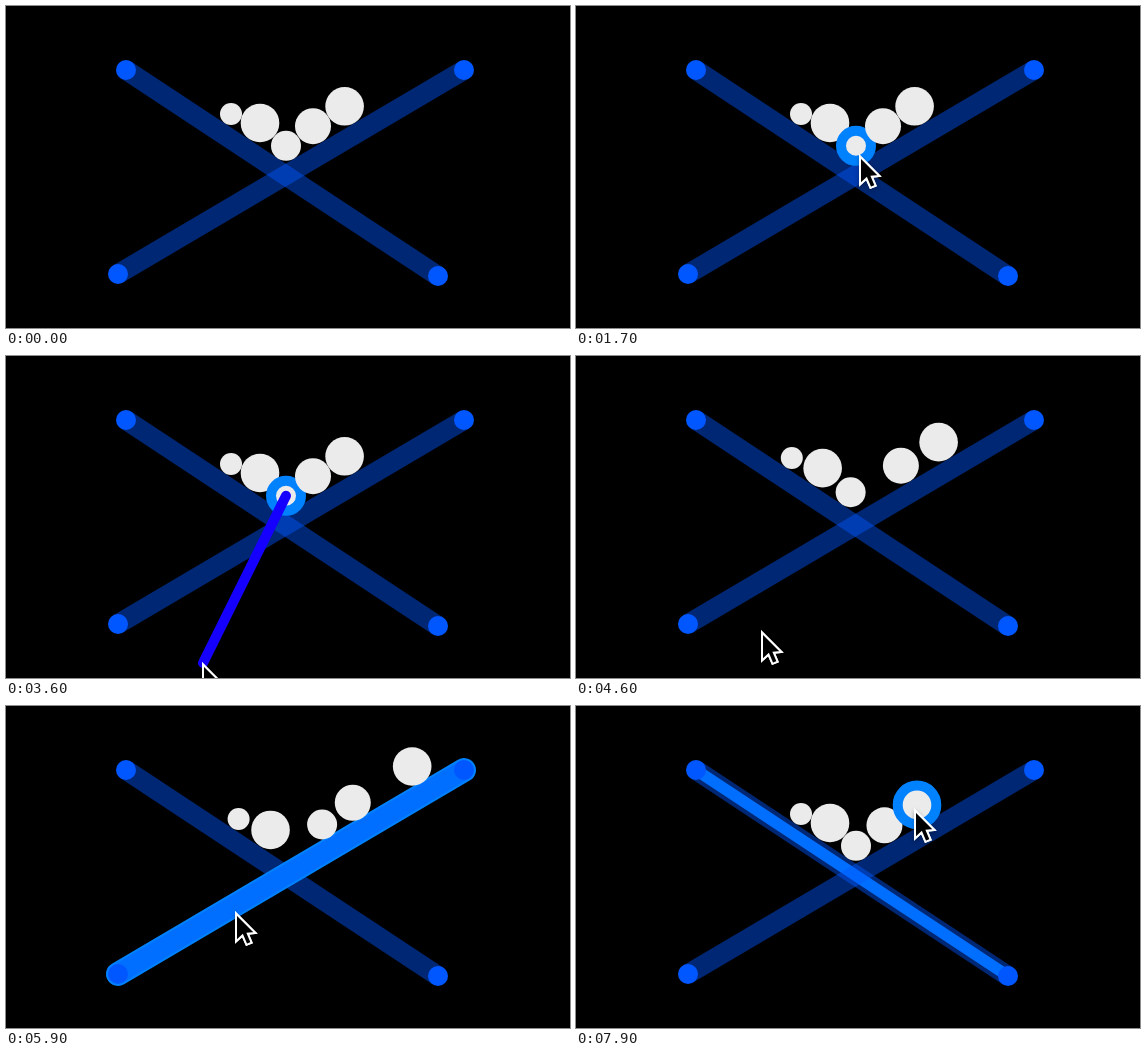
Recreate the animation shown at these times as an HTML page with a canvas. Size 564 by 322 pixels, loop 8 s.

```html
<!DOCTYPE html>
<html lang="en">
<head>
<meta charset="utf-8">
<title>Balls on crossed beams</title>
<style>
html, body { margin: 0; width: 100%; height: 100%; overflow: hidden; background: #000; }
canvas { display: block; }
</style>
</head>
<body>
<canvas id="stage" width="564" height="322"></canvas>
<script>
const ctx = document.getElementById('stage').getContext('2d');
const LOOP = 8000, STEP = 100;
const BLUE = '#0057ff', HOVER = '#0082ff';
const SHOT = 4.495;          // moment the dragged ball is released
const SWELL = 96;            // growth of hover strokes, px per second
const GRAVITY = 635;

// Beams run from their first end to the second; hover lists [from, until] spans.
const fallBeam = { ends: [120, 64, 432, 270], uphill: -1, hover: [[7.78, 8.1]] };
const riseBeam = { ends: [112, 268, 458, 64], uphill: 1,
  hover: [[.25, .95], [2.05, 2.45], [5.5, 6.6]] };

for (const beam of [fallBeam, riseBeam]) {
  const [x1, y1, x2, y2] = beam.ends, length = Math.hypot(x2 - x1, y2 - y1);
  beam.up = [(x2 - x1) / length * beam.uphill, (y2 - y1) / length * beam.uphill];
  beam.pull = -GRAVITY * beam.up[1] / 2;
}

// throws: [start, distance uphill, end, distance uphill, beam if not the ball's own]
const middle = { x: 280, y: 139.8, r: 15, beam: riseBeam, hover: [[.85, 4.6]],
  throws: [[SHOT, 0, 4.95, 0, fallBeam], [5.25, 0, 6.3, 0], [6.6, 0, 7.05, 0, fallBeam]] };
const balls = [
  { x: 225, y: 108, r: 11, beam: fallBeam, throws: [[SHOT, 0, 5.2, 0], [6.2, -13, 7.17, 0]] },
  { x: 254, y: 117, r: 19.3, beam: fallBeam, throws: [[SHOT, 0, 5.08, 0], [6.25, -18, 7.05, 0]] },
  middle,
  { x: 307, y: 120.2, r: 18, beam: riseBeam,
    throws: [[SHOT, 0, 5.55, 47], [5.55, 47, 6.2, 14], [6.55, 0, 6.9, 1.7]] },
  { x: 338.6, y: 100.3, r: 19.3, beam: riseBeam, hover: [[7.75, 8.2]],
    throws: [[SHOT, 0, 6.22, 7.3], [6.22, 7.3, 6.96, 2.8]] }
];

const pointer = [[.1, 236, 325], [1, 284, 149], [1.9, 284, 149], [2.7, 207, 296],
  [3.6, 197, 307], [4.4, 186, 275], [4.6, 186, 275], [5.9, 230, 206],
  [6.9, 286, 94], [7.5, 310, 180], [7.9, 339, 103]];
const ARROW = [[0, 0], [0, 28], [6.5, 22], [10.5, 31.3], [15.6, 29.2], [11.8, 20.2], [19.5, 19.5]];

const lerp = (a, b, f) => a + (b - a) * f;
const clamp = (v, max) => Math.max(0, Math.min(max, v));

function swell(spans, t, max) {
  return Math.max(0, ...spans.map(([from, until]) =>
    clamp(Math.min(t - from, until - t) * SWELL, max)));
}

// A ball follows a parabola during a throw and drifts evenly between throws.
function place(ball, t) {
  let s = 0, beam = ball.beam, last;
  for (const [t0, s0, t1, s1, other] of ball.throws) {
    if (t < t0) {
      if (last) s = lerp(last.s, s0, (t - last.t) / (t0 - last.t));
      break;
    }
    if (t < t1) {
      beam = other || beam;
      s = lerp(s0, s1, (t - t0) / (t1 - t0)) + beam.pull * (t - t0) * (t1 - t);
      break;
    }
    s = s1;
    last = { t: t1, s: s1 };
  }
  return [ball.x + beam.up[0] * s, ball.y + beam.up[1] * s];
}

function pointerAt(t) {
  const i = pointer.findIndex(p => p[0] > t);
  if (i < 1) return pointer.at(i).slice(1);
  const [t0, x0, y0] = pointer[i - 1], [t1, x1, y1] = pointer[i];
  const f = (t - t0) / (t1 - t0), eased = f * f * (3 - 2 * f);
  return [lerp(x0, x1, eased), lerp(y0, y1, eased)];
}

function line(x1, y1, x2, y2, width, color, cap) {
  ctx.beginPath();
  ctx.moveTo(x1, y1);
  ctx.lineTo(x2, y2);
  ctx.lineWidth = width;
  ctx.strokeStyle = color;
  ctx.lineCap = cap;
  ctx.stroke();
}

function disc(x, y, r, color) {
  ctx.beginPath();
  ctx.arc(x, y, r, 0, 7);
  ctx.fillStyle = color;
  ctx.fill();
}

function drawBeam(beam, t) {
  const [x1, y1, x2, y2] = beam.ends, glow = swell(beam.hover, t, 24);
  if (glow) line(x1, y1, x2, y2, glow, HOVER, 'round');
  ctx.globalAlpha = .45;
  line(x1, y1, x2, y2, 20, BLUE, 'butt');
  ctx.globalAlpha = 1;
  disc(x1, y1, 10, BLUE);
  disc(x2, y2, 10, BLUE);
}

function drawBall(ball, t) {
  disc(...place(ball, t), ball.r, '#ebebeb');
  const ring = swell(ball.hover || [], t, 10);
  if (ring) {
    ctx.lineWidth = ring;
    ctx.strokeStyle = HOVER;
    ctx.stroke();
  }
}

function drawPointer(x, y) {
  ctx.save();
  ctx.translate(x, y + 1.5);
  ctx.beginPath();
  ARROW.forEach(p => ctx.lineTo(...p));
  ctx.closePath();
  ctx.lineWidth = 2;
  ctx.strokeStyle = '#fff';
  ctx.fillStyle = '#000';
  ctx.shadowColor = 'rgba(0,0,0,.4)';
  ctx.shadowBlur = 4;
  ctx.shadowOffsetY = 2;
  ctx.stroke();
  ctx.shadowColor = 'transparent';
  ctx.fill();
  ctx.stroke();
  ctx.restore();
}

function draw(t) {
  ctx.fillStyle = '#000';
  ctx.fillRect(0, 0, 564, 322);
  drawBeam(fallBeam, t);
  drawBeam(riseBeam, t);
  balls.forEach(ball => drawBall(ball, t));
  const tip = pointerAt(t);
  if (t >= 1.9 && t < 4.55) line(...place(middle, t), ...tip, 10, '#1500ff', 'round');
  drawPointer(...tip);
}

const start = performance.now();
function tick() {
  const ms = (performance.now() - start) % LOOP;
  draw(Math.floor(ms / STEP) * STEP / 1000);
  requestAnimationFrame(tick);
}
tick();
</script>
</body>
</html>
```
